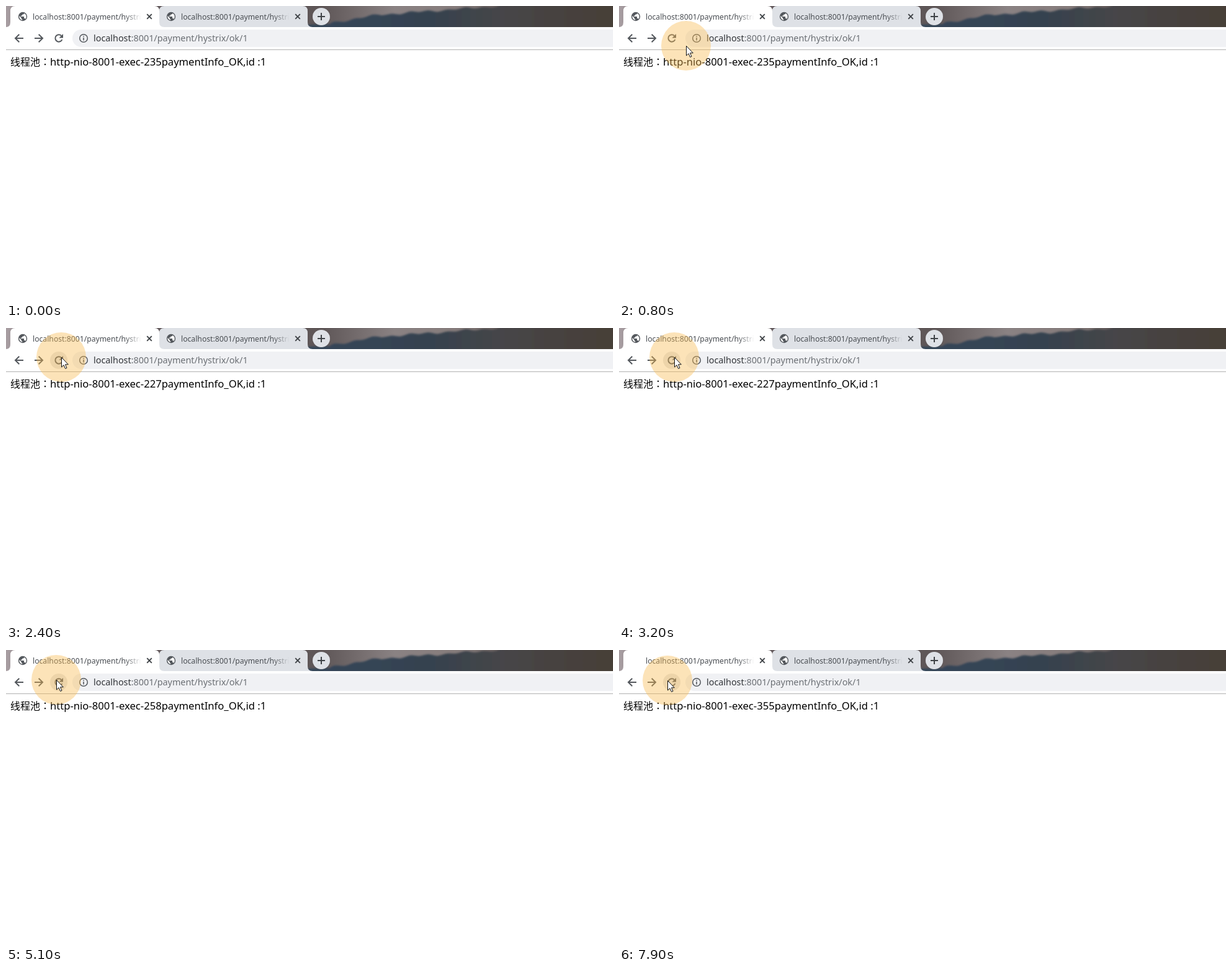
An HTML page that plays this animation: 978x474 px, repeating every 8 s.

```html
<!DOCTYPE html>
<html lang="zh">
<head>
<meta charset="utf-8">
<style>
html, body { margin: 0; width: 100%; height: 100%; overflow: hidden; background: #fff; }
svg { display: block; }
text { font-family: "Noto Sans", "Open Sans", sans-serif; }
.cjk { font-family: "Noto Sans CJK SC", "Noto Sans CJK", sans-serif; font-size: 16px; }
.colon { font-family: "Noto Sans CJK TC", "Noto Sans CJK", sans-serif; }
.page { font-size: 16.6px; }
.url { font-size: 14.37px; fill: #6b6f74; }
.title { font-size: 12.2px; fill: #4a4e53; }
.line { fill: none; stroke: #54585d; stroke-width: 2; }
</style>
</head>
<body>
<svg width="978" height="474" viewBox="0 0 978 474">
  <defs>
    <linearGradient id="sky">
      <stop offset="0" stop-color="#a89ea2"/>
      <stop offset=".1" stop-color="#6a6064"/>
      <stop offset=".52" stop-color="#5e5657"/>
      <stop offset=".64" stop-color="#8a8283"/>
      <stop offset=".76" stop-color="#857b7a"/>
      <stop offset=".84" stop-color="#544c4a"/>
      <stop offset="1" stop-color="#443b36"/>
    </linearGradient>
    <linearGradient id="hill">
      <stop offset="0" stop-color="#35465a"/>
      <stop offset=".4" stop-color="#35424f"/>
      <stop offset=".65" stop-color="#474547"/>
      <stop offset="1" stop-color="#463e36"/>
    </linearGradient>
    <linearGradient id="fade1">
      <stop offset="0" stop-color="#fff" stop-opacity="0"/>
      <stop offset="1" stop-color="#fff"/>
    </linearGradient>
    <linearGradient id="fade2">
      <stop offset="0" stop-color="#dee1e6" stop-opacity="0"/>
      <stop offset="1" stop-color="#dee1e6"/>
    </linearGradient>
    <filter id="soft" x="-5%" y="-30%" width="110%" height="160%"><feGaussianBlur stdDeviation="1.6"/></filter>
    <clipPath id="strip"><rect width="978" height="34"/></clipPath>
    <clipPath id="titleClip"><rect x="36" width="181" height="34"/></clipPath>
    <g id="globe">
      <circle r="7.2" fill="#54585d"/>
      <path transform="scale(.9) translate(-8 -8)" fill="#fff" d="M7.2 14.4 A6.4 6.4 0 0 1 1.8 6.6 L5.6 10.4 V11.2 Q5.6 12.8 7.2 12.8Z
        M12.7 12.4 Q12.3 11.2 11.2 11.2 H10.4 V8.8 Q10.4 8 9.6 8 H4.8 V6.4 H6.4 Q7.2 6.4 7.2 5.6 V4 H8.8 Q10.4 4 10.4 2.1 A6.4 6.4 0 0 1 12.7 12.4Z"/>
    </g>
    <path id="cross" d="M-3.8 -3.8 L3.8 3.8 M3.8 -3.8 L-3.8 3.8" fill="none" stroke="#3f4347" stroke-width="1.9"/>
    <path id="arrow" d="M7 0 H-6 M.3 -6.2 L-6 0 .3 6.2" class="line"/>
  </defs>

  <!-- wallpaper behind the tab strip -->
  <g clip-path="url(#strip)">
    <rect width="978" height="34" fill="url(#sky)"/>
    <path id="ridge" fill="url(#hill)" filter="url(#soft)"/>
  </g>

  <!-- tabs -->
  <path d="M239 34 Q247 34 247 26 V8 Q247 0 255 0 H478 Q486 0 486 8 V26 Q486 34 494 34Z" fill="#dee1e6"/>
  <path d="M0 34 Q7 34 7 26 V8 Q7 0 15 0 H239 Q247 0 247 8 V26 Q247 34 255 34Z" fill="#fff"/>
  <g clip-path="url(#titleClip)">
    <text class="title" x="43" y="22">localhost:8001/payment/hystrix/ok/1</text>
    <rect x="192" width="26" height="34" fill="url(#fade1)"/>
  </g>
  <g transform="translate(239)" clip-path="url(#titleClip)">
    <text class="title" x="43" y="22">localhost:8001/payment/hystrix/ok/1</text>
    <rect x="192" width="26" height="34" fill="url(#fade2)"/>
  </g>
  <use id="icon" href="#globe" x="27" y="17"/>
  <path id="spinner" fill="none" stroke="#80868b" stroke-width="2"/>
  <use href="#globe" x="266" y="17"/>
  <use href="#cross" x="231" y="17"/>
  <use href="#cross" x="470" y="17"/>
  <circle cx="508" cy="17" r="14" fill="#dee1e6"/>
  <path d="M502 17 H514 M508 11 V23" fill="none" stroke="#3f4347" stroke-width="2"/>

  <!-- toolbar -->
  <rect y="34" width="978" height="36" fill="#fff"/>
  <rect x="107" y="38" width="900" height="28" rx="14" fill="#f0f1f4"/>
  <rect y="70" width="978" height="1" fill="#b2b2b2"/>
  <use href="#arrow" x="21" y="52"/>
  <use href="#arrow" transform="translate(53 52) scale(-1 1)"/>
  <circle id="hover" cx="85" cy="52" r="14" fill="#000" fill-opacity=".1"/>
  <path d="M89.2 48 A5.7 5.7 0 1 0 90.4 54" class="line"/>
  <path d="M92 45 V51.5 H85.5Z" fill="#54585d"/>
  <circle cx="125" cy="52" r="6.3" class="line" style="stroke-width:1.5"/>
  <path d="M125 51 V55.5 M125 48.2 V49.8" class="line" style="stroke-width:1.6"/>
  <text class="url" x="141" y="57"><tspan fill="#303337">localhost</tspan>:8001/payment/hystrix/ok/1</text>

  <!-- page -->
  <text class="cjk" x="7" y="96">线程池<tspan class="colon" lang="zh-TW">：</tspan></text>
  <text class="page" id="reply" x="71" y="96"></text>

  <g id="pointer">
    <circle r="40" fill="#f8ba4f" fill-opacity=".4"/>
    <path d="M.5 .5 V16 L4 12.7 6.6 18.5 9 17.4 6.5 11.8 H11.3Z" fill="#fff" stroke="#111"/>
  </g>
</svg>
<script>
const LOOP = 8000, STEP = 100;
const $ = id => document.getElementById(id);
const show = (el, on) => el.setAttribute("visibility", on ? "visible" : "hidden");

// time, x, y of the pointer tip
const path = [
  [100, 932, 426], [800, 108, 64], [1400, 90, 48], [3200, 89, 47],
  [4200, 87, 46], [5000, 82, 48], [5600, 78, 49], [LOOP, 78, 49]
];
// load start, reply time, worker thread
const loads = [
  [-1, 0, 235], [1800, 2100, 227], [3400, 3700, 320],
  [4500, 4800, 258], [5900, 6300, 355], [7900, 8300, 355]
];

function pointerAt(t) {
  const i = Math.max(1, path.findIndex(p => p[0] >= t));
  const [t0, x0, y0] = path[i - 1], [t1, x1, y1] = path[i];
  const k = (t - t0) / (t1 - t0), e = k * (2 - k);
  return [x0 + (x1 - x0) * e, y0 + (y1 - y0) * e];
}

function drawRidge() {
  let d = "M480 34 L486 30 522 29";
  for (let x = 525; x <= 978; x += 5) {
    const slope = x < 600 ? 27 - (x - 525) * .17 : 14.2 - (x - 600) * .073;
    const y = slope + 1.2 * Math.sin(x * .21) + Math.sin(x * .083);
    d += ` L${x} ${y.toFixed(1)}`;
  }
  $("ridge").setAttribute("d", d + " L985 40 H480Z");
}

function arc(cx, cy, r, from, sweep) {
  const at = a => `${cx + r * Math.sin(a)} ${cy - r * Math.cos(a)}`;
  return `M${at(from)} A${r} ${r} 0 ${+(sweep > Math.PI)} 0 ${at(from - sweep)}`;
}

function draw(now) {
  const t = Math.floor(now % LOOP / STEP) * STEP;
  const [x, y] = pointerAt(Math.max(t, STEP));
  $("pointer").setAttribute("transform", `translate(${Math.round(x)} ${Math.round(y)})`);
  show($("pointer"), t >= STEP);
  show($("hover"), t >= STEP && Math.hypot(x - 85, y - 52) < 14);

  const thread = loads.filter(l => l[1] <= t).pop()[2];
  $("reply").textContent = `http-nio-8001-exec-${thread}paymentInfo_OK,id :1`;

  const load = loads.find(l => t >= l[0] && t < l[1]);
  const busy = load && load[0] >= 0;
  show($("icon"), !busy);
  show($("spinner"), busy && t > load[0]);
  if (busy) $("spinner").setAttribute("d", arc(27, 17, 7, 0, (t - load[0]) / 300));
}

drawRidge();
const start = performance.now();
(function tick() {
  draw(performance.now() - start);
  requestAnimationFrame(tick);
})();
</script>
</body>
</html>
```
